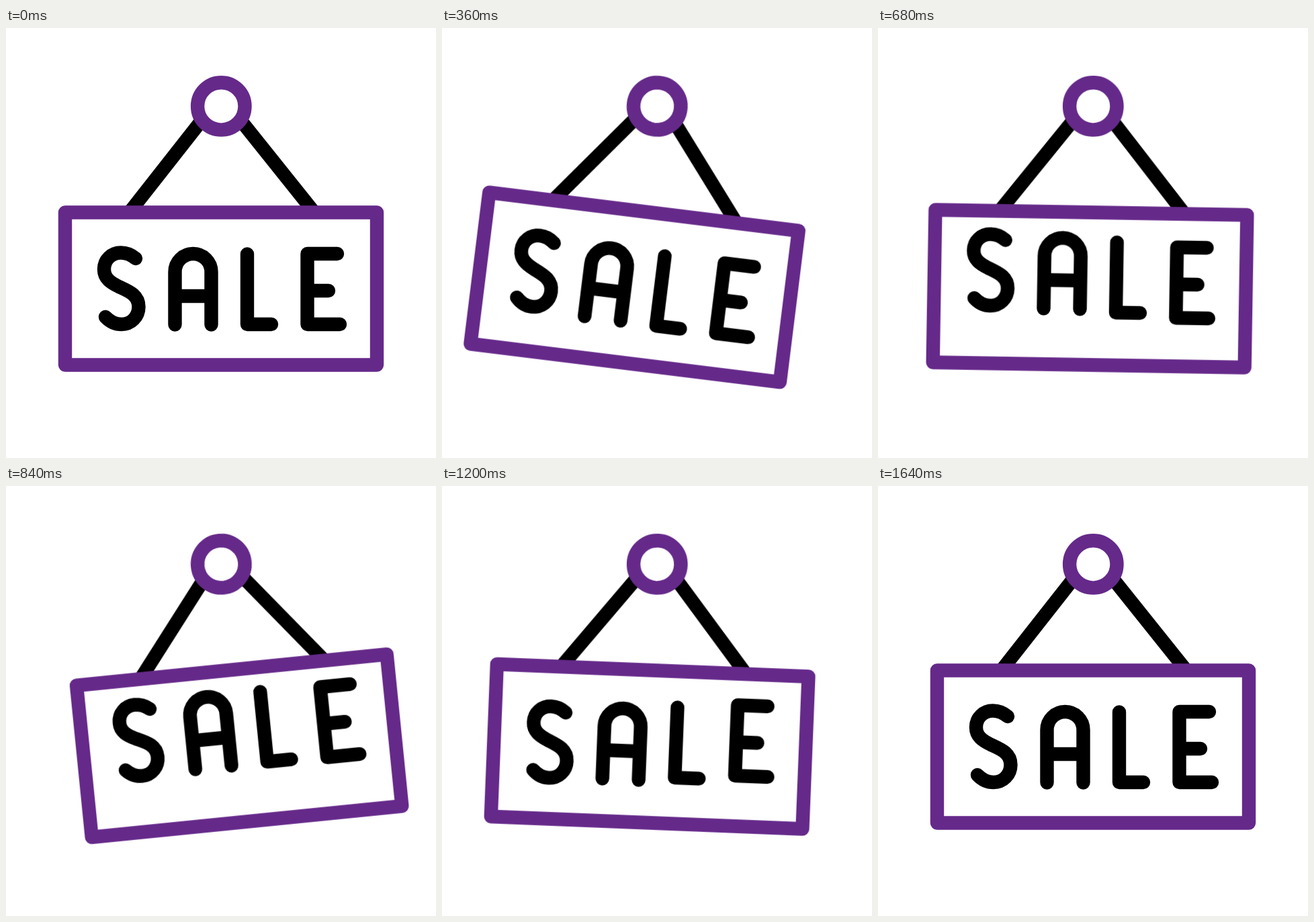
Write an HTML page without scripts that moves like this. It is 640 px wide and 640 px high and loops after 1.68 s.

```html
<!DOCTYPE html>
<html lang="en">
<head>
<meta charset="utf-8">
<title>Swinging sale sign</title>
<style>
  html, body { margin: 0; width: 100%; height: 100%; overflow: hidden; background: #fff; }
  svg { display: block; width: 100%; height: 100%; fill: none; stroke-width: 20.4; }

  .sign { transform-origin: 320px 116px; animation: swing 1680ms ease-in-out infinite; }
  .frame { stroke: #65298a; stroke-linejoin: round; }
  .rope, .letters { stroke: #000; }
  .letters { stroke-linecap: round; stroke-linejoin: round; }
  .letters path { animation: hop 1680ms var(--delay, 0ms) ease-in-out infinite; }

  @keyframes swing {
    0% { transform: rotate(0deg); }
    2.38% { transform: rotate(0deg); animation-timing-function: cubic-bezier(.42, 0, .5, 1); }
    28.57% { transform: rotate(8deg); }
    52.38% { transform: rotate(-6deg); }
    76.19% { transform: rotate(3deg); }
    96.43%, 100% { transform: rotate(0deg); }
  }
  @keyframes hop {
    0%, 11.31% { transform: translateY(0); }
    42.86% { transform: translateY(-25.5px); }
    74.4%, 100% { transform: translateY(0); }
  }
</style>
</head>
<body>
<svg viewBox="0 0 640 640" role="img" aria-label="Sale">
  <g class="sign">
    <path class="rope" d="M294 134L184 274M346.500 134L458.500 274"/>
    <g class="frame">
      <circle cx="320.300" cy="116.400" r="35.200"/>
      <rect x="88" y="274.500" width="464" height="227"/>
    </g>
    <g class="letters">
      <path d="M193 343C186 337 179 334.500 171 334.500C157 334.500 146 345 146 359C146 373 156 379 168 385C182 391.500 197.500 397 197.500 415C197.500 430 186 441 172 441C162 441 154 436.500 148 430"/>
      <path style="--delay: 80ms" d="M251.500 441.500V363a27 27 0 0 1 54 0V441.500M251.500 399H305"/>
      <path style="--delay: 160ms" d="M359 336.500V441H395"/>
      <path style="--delay: 240ms" d="M493 336H448.500V441H497M448.500 391H480"/>
    </g>
  </g>
</svg>
</body>
</html>
```
